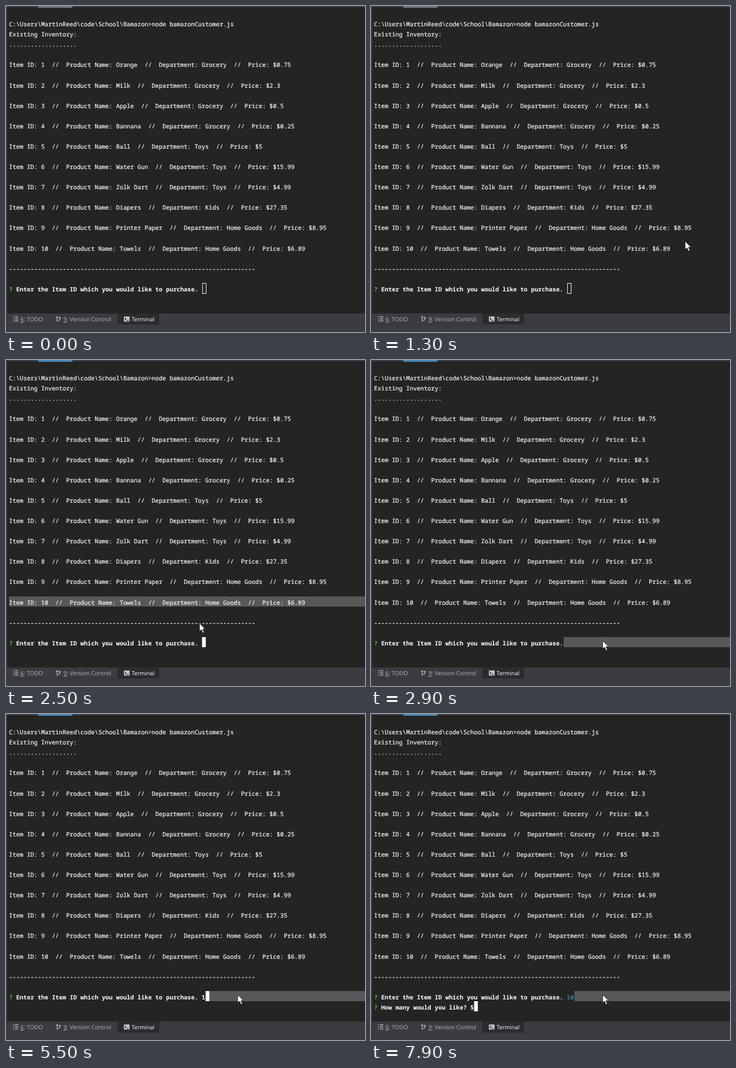
These frames come from a looping animation (600 px wide and 546 px high, 8000 ms). An HTML page:

```html
<!DOCTYPE html>
<html lang="en">
<head>
<meta charset="utf-8">
<title>Terminal</title>
<style>
  html, body { margin: 0; width: 100%; height: 100%; overflow: hidden; background: #242422; }
  svg { display: block; width: 600px; height: 546px; }
  text { white-space: pre; text-rendering: geometricPrecision; }
  .mono { font: 9.955px "Noto Sans Mono", "DejaVu Sans Mono", monospace; fill: #f6f6f6; stroke: #f6f6f6; stroke-width: .22px; }
  .bold { font-weight: 700; fill: #fff; stroke: none; }
  .ok { fill: #45c055; }
  .answer { font-weight: 400; fill: #3595ae; stroke: #3595ae; }
  .tab { font: 9.6px "Open Sans", "Noto Sans", sans-serif; fill: #b4b5b7; }
  .key { text-decoration: underline; }
</style>
</head>
<body>
<svg id="stage" viewBox="0 0 600 546">
  <rect width="600" height="546" fill="#242422"/>
  <rect id="strip" width="600" height="2"/>
  <rect width="2" height="516" fill="#3b3c41"/>
  <rect id="focus" x="54" width="57" height="3"/>

  <rect id="selection" height="17" fill="#585858"/>
  <g id="lines" class="mono"></g>
  <rect id="caret"/>

  <rect y="515" width="600" height="31" fill="#3b3c41"/>
  <rect x="186" y="515" width="70" height="18" fill="#2b2c30"/>
  <rect y="533" width="600" height="1" fill="#333439"/>
  <path d="M12 520.5h1.5M15 520.5h5.5M12 524h1.5M15 524h5.5M12 527.5h1.5M15 527.5h5.5"
        stroke="#b4b5b7" stroke-width="1.3"/>
  <path d="M85.5 520v9M85.5 526.5h2q2.5 0 2.5-2.5v-2M83.7 521.8l1.8-1.8 1.8 1.8M88.2 522.8l1.8-1.8 1.8 1.8"
        fill="none" stroke="#b4b5b7" stroke-width="1.2"/>
  <rect x="197" y="520" width="9.5" height="8.5" fill="#c3c5c7"/>
  <path d="M198.7 522l2 2-2 2M201.7 526.6h3.2" fill="none" stroke="#2b2c30" stroke-width="1.1"/>
  <text class="tab" x="24" y="528"><tspan class="key">6</tspan>: TODO</text>
  <text class="tab" x="96" y="528"><tspan class="key">9</tspan>: Version Control</text>
  <text class="tab" x="210" y="528" style="font-size:9.4px;fill:#fff">Terminal</text>

  <path id="mouse" d="M0 0V13.8L3.2 10.9L5.6 16.6L7.9 15.6L5.5 10.1H9.6Z"
        fill="#fff" stroke="#111" stroke-width=".8" stroke-linejoin="round"/>
</svg>
<script>
const LOOP = 8000, STEP = 100, LEFT = 5.1, CHAR = 5.973, TOP = 21.2, ROW = 17.06;
const FOCUS = 1400, CLICK = 2800, ENTER = 6200;
const $ = id => document.getElementById(id);
const colX = c => LEFT + c * CHAR;
const rowY = r => TOP + r * ROW;
const cellY = r => Math.floor(rowY(r));

function set(el, attrs) {
  for (const k in attrs) el.setAttribute(k, attrs[k]);
}

function add(tag, parent, cls, content = '') {
  const el = document.createElementNS('http://www.w3.org/2000/svg', tag);
  if (cls) el.setAttribute('class', cls);
  el.textContent = content;
  return parent.appendChild(el);
}

function line(row, content, cls) {
  const el = add('text', $('lines'), cls, content);
  set(el, { x: LEFT, y: rowY(row) + 13 });
  return el;
}

function question(row, prompt) {
  const el = line(row, '', 'bold');
  add('tspan', el, 'ok', '?');
  add('tspan', el, '', ' ' + prompt + ' ');
  return { el, reply: add('tspan', el) };
}

const stock = [
  ['Orange', 'Grocery', '0.75'], ['Milk', 'Grocery', '2.3'],
  ['Apple', 'Grocery', '0.5'], ['Bannana', 'Grocery', '0.25'],
  ['Ball', 'Toys', '5'], ['Water Gun', 'Toys', '15.99'],
  ['Zolk Dart', 'Toys', '4.99'], ['Diapers', 'Kids', '27.35'],
  ['Printer Paper', 'Home Goods', '8.95'], ['Towels', 'Home Goods', '6.89']
];

line(0, 'C:\\Users\\MartinReed\\code\\School\\Bamazon>node bamazonCustomer.js');
line(1, 'Existing Inventory:');
line(2, '.'.repeat(19));
stock.forEach(([name, dept, price], i) => line(4 + 2 * i,
  `Item ID: ${i + 1}  //  Product Name: ${name}  //  Department: ${dept}  //  Price: $${price}`));
line(24, '-'.repeat(69));
const askId = question(26, 'Enter the Item ID which you would like to purchase.');
const askCount = question(27, 'How many would you like?');

// time, x, y of the pointer
const path = [
  [100, 547, 508], [400, 540, 450], [800, 529, 400], [1300, 525, 394],
  [1400, 515, 400], [1500, 440, 401], [1600, 300, 401], [1700, 165, 400],
  [1800, 73, 400], [1900, 41, 400], [2000, 8, 401], [2100, 4, 403],
  [2400, 250, 430], [2700, 470, 462], [2800, 404, 470], [2900, 387.2, 470]
];

function pointer(t) {
  const i = path.findIndex(p => p[0] > t);
  if (i < 0) return path[path.length - 1].slice(1);
  if (i === 0) return path[0].slice(1);
  const [a, b] = [path[i - 1], path[i]];
  const k = (t - a[0]) / (b[0] - a[0]);
  return [a[1] + (b[1] - a[1]) * k, a[2] + (b[2] - a[2]) * k];
}

const caretOn = [[FOCUS, 2600], [3100, 3600], [4100, 4600], [5100, 6100], [ENTER, 7200], [7700, LOOP]];

function select(t, typed) {
  let row = 26, col = typed ? 54 + typed : 53;
  if (t < CLICK) {
    row = 22;
    // the highlight trails the pointer by one step
    const x = pointer(Math.min(t, 2100) - STEP)[0];
    col = Math.max(0, Math.floor((x - LEFT) / CHAR));
  }
  const x = Math.round(colX(col));
  set($('selection'), { x, y: cellY(row), width: 600 - x, visibility: t > FOCUS ? 'visible' : 'hidden' });
}

function render(time) {
  const t = Math.floor(time % LOOP / STEP) * STEP;
  const focused = t >= FOCUS, done = t >= ENTER;
  const id = t >= 5600 ? '10' : t >= 5500 ? '1' : '';
  const count = t >= 7800 ? '5' : '';

  set($('strip'), { fill: focused ? '#3a424d' : '#3b3c41' });
  set($('focus'), { fill: focused ? '#4a88b8' : '#72767c' });
  askId.reply.textContent = id;
  set(askId.reply, { class: done ? 'answer' : 'bold' });
  askCount.reply.textContent = count;
  set(askCount.el, { visibility: done ? 'visible' : 'hidden' });
  select(t, id.length);

  const x = colX(done ? 27 + count.length : 54 + id.length);
  const y = cellY(done ? 27 : 26);
  const visible = !focused || caretOn.some(([a, b]) => t >= a && t < b);
  set($('caret'), focused
    ? { x, y, width: 6.2, height: 17, fill: '#fff', stroke: 'none' }
    : { x: Math.round(x) + .5, y: y + .5, width: 6, height: 17, fill: 'none', stroke: '#e8e8e8' });
  set($('caret'), { visibility: visible ? 'visible' : 'hidden' });

  set($('mouse'), {
    transform: `translate(${pointer(t)})`,
    visibility: t >= path[0][0] ? 'visible' : 'hidden'
  });
}

let start;
function tick(now) {
  start ??= now;
  render(now - start);
  requestAnimationFrame(tick);
}
render(0);
requestAnimationFrame(tick);
</script>
</body>
</html>
```
